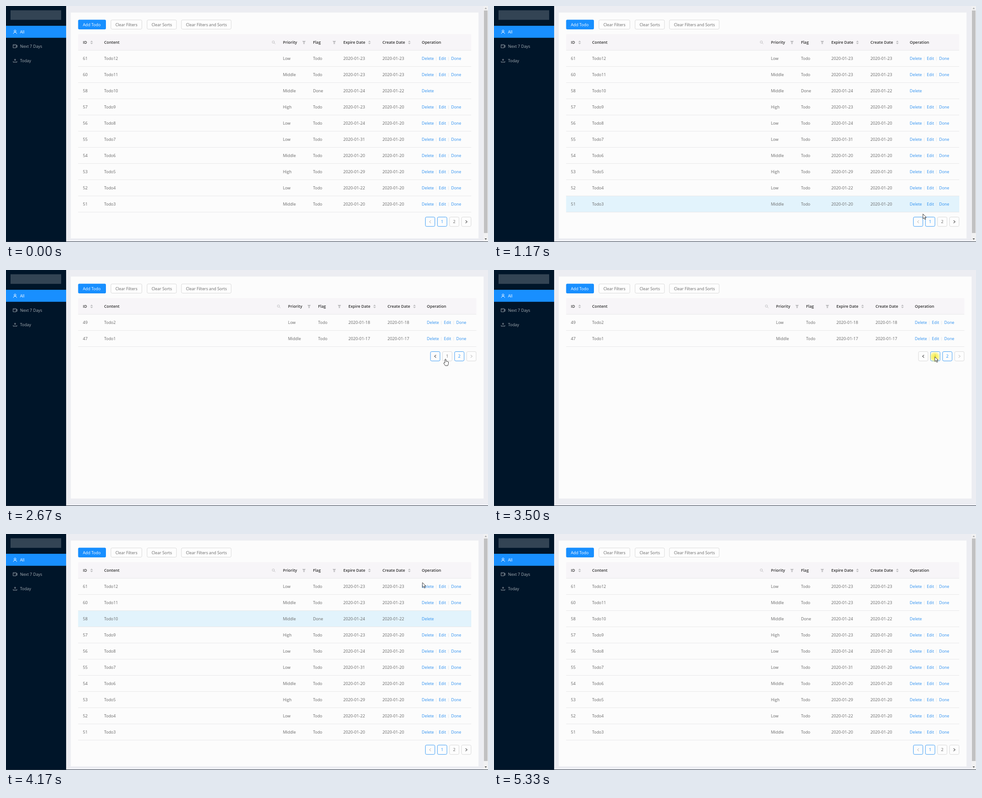
An HTML page that plays this animation: 1066 by 525 pixels, repeating every 5.49 s.

```html
<!DOCTYPE html>
<html lang="en">
<head>
<meta charset="utf-8">
<title>Todo list</title>
<style>
  html, body { margin: 0; width: 100%; height: 100%; overflow: hidden; background: #ecedf2; }
  svg { display: block; width: 1066px; height: 525px; font: 8.9px "Open Sans", "Noto Sans", sans-serif; }
  .head { font-size: 8.75px; font-weight: 600; }
  .date { font-size: 9.2px; }
</style>
</head>
<body>
<svg id="stage" viewBox="0 0 1066 525"></svg>
<script>
const stage = document.getElementById('stage');
const LOOP = 5490, STEP = 500 / 3;
const BLUE = '#188fff', LINK = '#2b8ff0', GREY = '#666', LINE = '#e8e8e9', ICON = '#bdbdbf';
const ROW_TOP = 98, ROW_HEIGHT = 36;

// id, content number, priority, flag, expire day, create day
const firstPage = [
  [61, 12, 'Low', 'Todo', 23, 23], [60, 11, 'Middle', 'Todo', 23, 23],
  [58, 10, 'Middle', 'Done', 24, 22], [57, 9, 'High', 'Todo', 23, 20],
  [56, 8, 'Low', 'Todo', 24, 20], [55, 7, 'Low', 'Todo', 31, 20],
  [54, 6, 'Middle', 'Todo', 20, 20], [53, 5, 'High', 'Todo', 29, 20],
  [52, 4, 'Low', 'Todo', 22, 20], [51, 3, 'Middle', 'Todo', 20, 20]
];
const secondPage = [[49, 2, 'Low', 'Todo', 18, 18], [47, 1, 'Middle', 'Todo', 17, 17]];

// Pointer path: step, x, y
const pointerPath = [
  [1, 852, 505], [2, 862, 412], [3, 867, 417], [5, 878, 424], [8, 984, 482],
  [13, 986, 482], [14, 986, 452], [16, 972, 198], [21, 975, 193], [23, 975, 193],
  [24, 972, 188], [25, 921, 108], [27, 905, 100], [28, 908, 180], [31, 950, 505]
];

const rect = (x, y, w, h, fill, extra = '') =>
  `<rect x="${x}" y="${y}" width="${w}" height="${h}" fill="${fill}" ${extra}/>`;
const text = (x, y, content, fill = GREY, extra = '') =>
  `<text x="${x}" y="${y}" fill="${fill}" ${extra}>${content}</text>`;
const path = (d, fill, stroke = 'none', extra = '') =>
  `<path d="${d}" fill="${fill}" stroke="${stroke}" ${extra}/>`;
const at = (x, y, content) => `<g transform="translate(${x} ${y})">${content}</g>`;

function pointerAt(step) {
  const next = pointerPath.findIndex(p => p[0] >= step);
  if (next < 0 || step < pointerPath[0][0]) return null;
  const b = pointerPath[next], a = pointerPath[next - 1] || b;
  const k = a === b ? 0 : (step - a[0]) / (b[0] - a[0]);
  return { x: a[1] + (b[1] - a[1]) * k, y: a[2] + (b[2] - a[2]) * k };
}

function rowAt(step) {
  const p = pointerAt(step);
  return p ? Math.floor((p.y - ROW_TOP) / ROW_HEIGHT) : -1;
}

function sidebar() {
  const muted = '#a6adb4';
  return rect(0, 0, 133, 525, '#001529') + rect(10, 9.5, 112, 21.3, '#334454') +
    rect(0, 44, 133, 26.7, BLUE) +
    at(20, 57.5, path('M-3.7 4.2C-3.5-.3 3.5-.3 3.7 4.2M-2.1-1.9a2.1 2.1 0 1 0 4.2 0a2.1 2.1 0 1 0-4.2 0', 'none', '#fff')) +
    at(20, 89.5, path('M-4.3-3.5H2.4V3.5H-4.3ZM2.4-1L4.7-2.3V2.3L2.4 1M-2.8-1.5H-.8', 'none', muted, 'stroke-width=".9"')) +
    at(20, 121.5, path('M-4 1.3V3.6H4V1.3M0 1.5V-3.2M-1.8-1.6L0-3.6L1.8-1.6', 'none', muted, 'stroke-width=".9"')) +
    text(31, 61, 'All', '#fff') + text(31, 93, 'Next 7 Days', muted) + text(31, 125, 'Today', muted);
}

function toolbar() {
  const button = (x, w, label) =>
    rect(x + .5, 31, w, 20.5, '#fdfdfd', 'rx="2.7" stroke="#d9d9d9"') + text(x + 10.5, 45, label);
  return rect(159.5, 30.5, 61.5, 21.5, BLUE, 'rx="2.7"') + text(170, 45, 'Add Todo', '#fff') +
    button(231.5, 68.5, 'Clear Filters') + button(311.5, 65, 'Clear Sorts') +
    button(387.5, 110, 'Clear Filters and Sorts');
}

function header(shift, right) {
  const title = (x, label) => text(x, 84, label, '#303030', 'class="head"');
  const sorter = x => at(x, 81, path('M-3-.8L0-4L3-.8ZM-3 .9L0 4.1L3 .9Z', ICON));
  const filter = x => at(x, 81, path('M-3.7-3.3H3.7L1.5 .2H-1.5ZM-1.5 1H1.5V3.6H-1.5Z', ICON));
  return rect(159.5, 62.5, right - 159.5, 36, '#f7f5f8', 'rx="2"') +
    title(170, 'ID') + sorter(189.3) + title(217, 'Content') +
    at(shift, 0,
      at(592, 81, path('M1.3 1.2L3.6 3.6M-3.3-.8a2.5 2.5 0 1 0 5 0a2.5 2.5 0 1 0-5 0', 'none', ICON)) +
      title(612.5, 'Priority') + filter(659) + title(679, 'Flag') + filter(726) +
      title(746, 'Expire Date') + sorter(803.8) + title(832.5, 'Create Date') + sorter(892) +
      title(919.5, 'Operation'));
}

function tableRow([id, number, priority, flag, expire, create], index, shift, right, glow) {
  const top = ROW_TOP + index * ROW_HEIGHT, y = top + 22.2;
  const date = (x, day) => text(x, y, '2020-01-' + day, GREY, 'class="date"');
  const divider = x => rect(x, y - 7.2, 1, 8.5, LINE);
  const more = flag === 'Done' ? '' :
    divider(951) + text(957.3, y, 'Edit', LINK) + divider(978) + text(984.5, y, 'Done', LINK);
  return (glow ? rect(159.5, top, right - 159.5, ROW_HEIGHT, '#e2f3fc', `opacity="${glow}"`) : '') +
    rect(159.5, top, right - 159.5, 1, LINE) +
    text(170, y, id, GREY, 'class="date"') + text(217, y, 'Todo' + number) +
    at(shift, 0, text(612.5, y, priority) + text(679, y, flag) +
      date(746, expire) + date(832.5, create) + text(919.5, y, 'Delete', LINK) + more);
}

function pagination(page, right, bottom, hovered) {
  const y = bottom + 11.5;
  const box = (i, content) => {
    const stroke = i === page || i === hovered ? '#3b9cf5' : '#d9d9d9';
    return at(right - 101.5 + i * 26.67, y, rect(0, 0, 21, 20.8, '#fdfdfd', `rx="2.7" stroke="${stroke}"`) + content);
  };
  const arrow = (d, enabled) => path(d, 'none', enabled ? '#555' : '#c8c8c8', 'stroke-width="1.1"');
  const digit = n => text(10.5, 13.9, n, n === page || n === hovered ? BLUE : GREY,
    'class="date" text-anchor="middle"');
  return box(0, arrow('M12.4 7.5L8.8 10.5L12.4 13.5', page === 2)) + box(1, digit(1)) +
    box(2, digit(2)) + box(3, arrow('M8.8 7.5L12.4 10.5L8.8 13.5', page === 1));
}

function scrollbar() {
  return rect(1056, 0, 10, 525, '#f1f1f2') + rect(1057, 10, 8, 495, '#c1c1c2') +
    path('M1058.5 6.5L1061 3.5L1063.5 6.5Z', '#a3a3a3') +
    path('M1058.5 517L1061 520L1063.5 517Z', '#505050');
}

function pointer(step, isHand, pressed) {
  const p = pointerAt(step);
  if (!p) return '';
  const arrow = 'M0 0V10.6L2.5 8.3L4.3 12.3L6 11.5L4.3 7.6H7.5Z';
  const hand = 'M-1.2 8.5V1Q0-1 1.2 1V5Q4.5 4.6 6.5 6.5V10.5L5 14.8H-.5L-4 9.5Q-3.6 7-1.2 8.5Z';
  const halo = `<radialGradient id="halo"><stop stop-color="#f7e600" stop-opacity=".75"/>
    <stop offset=".6" stop-color="#faf03c" stop-opacity=".6"/>
    <stop offset="1" stop-color="#fff68a" stop-opacity="0"/></radialGradient>
    <circle r="13" fill="url(#halo)"/>`;
  return at(p.x, p.y, (pressed ? halo : '') +
    path(isHand ? hand : arrow, '#fff', '#222', 'stroke-width=".9" stroke-linejoin="round"'));
}

function draw(step) {
  const page = step >= 12 && step < 22 ? 2 : 1;
  const rows = page === 1 ? firstPage : secondPage;
  const shift = page === 1 ? 0 : 11.3, right = 1029 + shift;
  const bottom = ROW_TOP + rows.length * ROW_HEIGHT;
  const pressed = step === 11 || step === 21;
  const isHand = !pressed && (step >= 8 && step <= 11 || step >= 16 && step < 21);
  const hovered = page === 1 ? (step >= 9 && step < 12 ? 2 : 0) : (step >= 17 ? 1 : 0);

  // The row highlight trails the pointer by one step and fades in.
  const active = rowAt(step - 1), glow = active === rowAt(step - 2) ? 1 : .55;

  stage.innerHTML = rect(0, 0, 1066, 525, '#ecedf2') +
    rect(143.3, 14.5, 901.7 + shift, page === 1 ? 502.5 : 494, '#fcfcfc') +
    toolbar() + header(shift, right) +
    rows.map((row, i) => tableRow(row, i, shift, right, i === active ? glow : 0)).join('') +
    rect(159.5, bottom, right - 159.5, 1, LINE) +
    pagination(page, right, bottom, hovered) +
    (page === 1 ? scrollbar() : '') + sidebar() +
    rect(0, 524, 1066, 1, '#26323f') + pointer(step, isHand, pressed);
}

let shown = -1;
const start = performance.now();
function tick() {
  const time = (performance.now() - start) % LOOP;
  const step = Math.floor((time + 5) / STEP);
  if (step !== shown) draw(shown = step);
  requestAnimationFrame(tick);
}
tick();
</script>
</body>
</html>
```
